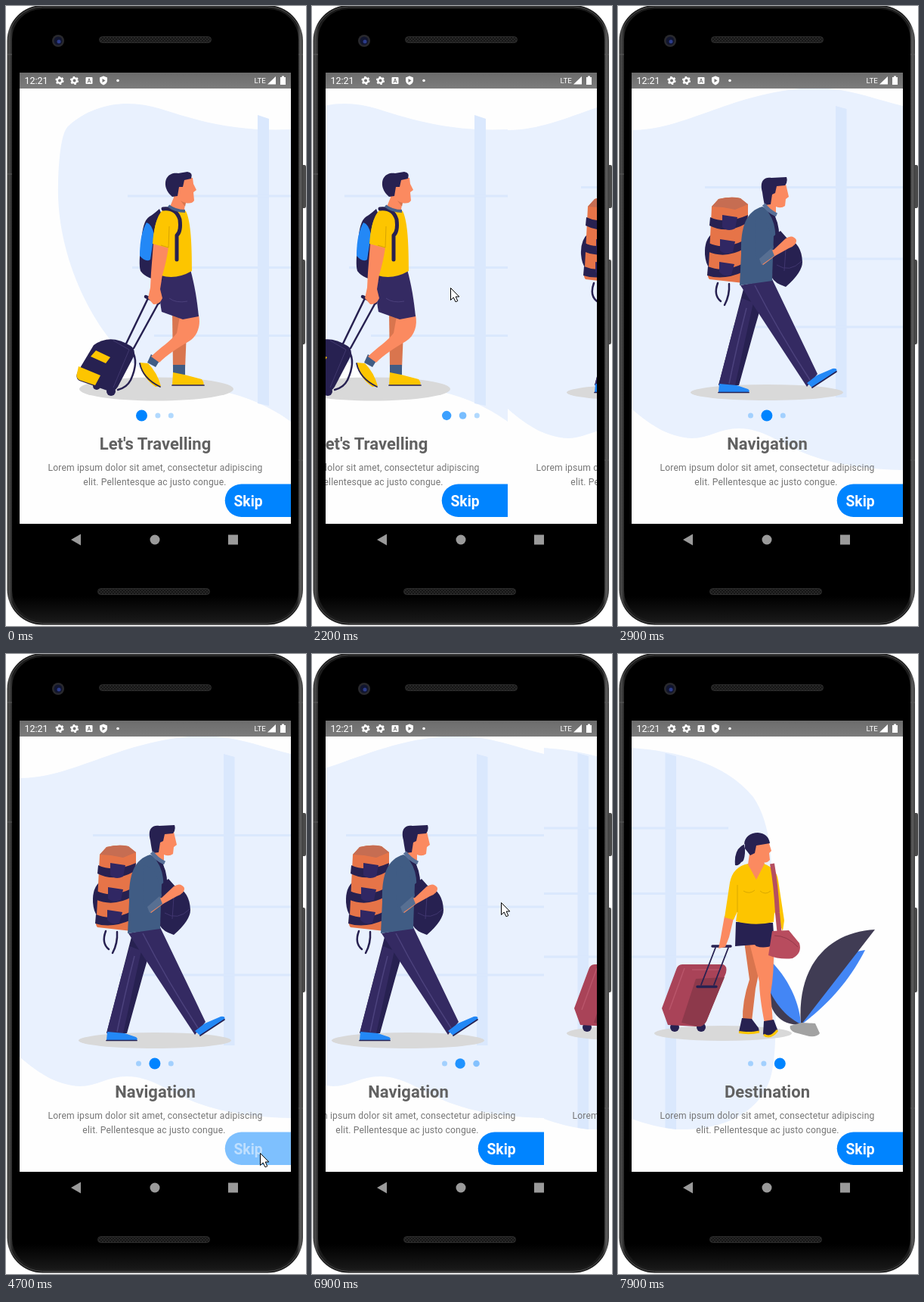
These frames come from a looping animation (397 by 819 pixels, 8000 ms). An HTML page:

```html
<!DOCTYPE html>
<html lang="en">
<head>
<meta charset="utf-8">
<title>Travel onboarding</title>
<style>
  html, body { margin: 0; width: 100%; height: 100%; overflow: hidden; background: #fff; }
  svg { display: block; width: 397px; height: 819px; font-family: Roboto, sans-serif; }
  .title { font-weight: 700; font-size: 22px; fill: #616161; text-anchor: middle; }
  .copy { font-size: 12.1px; letter-spacing: .17px; fill: #757575; text-anchor: middle; }
  .press { opacity: var(--press, 1); }
  .blob { fill: #e9f1fe; }
  .bars { fill: none; stroke: #dae8fd; stroke-width: 3; }
  .pane { fill: #dae8fd; }
  .shadow { fill: #d9d9d9; }
  .navy { fill: #272151; }
  .indigo { fill: #342a62; }
  .skin { fill: #fb8a60; }
  .tan { fill: #d9754e; }
  .yellow { fill: #fdc500; }
  .slate { fill: #405c84; }
  .blue { fill: #2388f6; }
  .line { fill: none; stroke: #272151; stroke-linecap: round; stroke-linejoin: round; }
</style>
</head>
<body>
<svg viewBox="0 0 397 819">
  <defs>
    <clipPath id="screen"><path d="M18 109H377V684H18Z"/></clipPath>
    <linearGradient id="rim" x2="1">
      <stop offset="0" stop-color="#222"/><stop offset=".008" stop-color="#484848"/>
      <stop offset=".02" stop-color="#1b1b1b"/><stop offset=".98" stop-color="#1b1b1b"/>
      <stop offset=".992" stop-color="#606060"/><stop offset="1" stop-color="#3a3a3a"/>
    </linearGradient>
    <linearGradient id="chin" x2="0" y2="1">
      <stop offset=".96" stop-color="#000"/><stop offset="1" stop-color="#181818"/>
    </linearGradient>
    <linearGradient id="bar" x2="0" y2="1">
      <stop offset="0" stop-color="#6c6c6c"/><stop offset="1" stop-color="#7c7c7c"/>
    </linearGradient>
    <pattern id="mesh" width="4" height="4" patternUnits="userSpaceOnUse">
      <path d="M0 0H4V4H0Z" fill="#161616"/><path d="M0 0L4 4M4 0L0 4" stroke="#2c2c2c" stroke-width=".8"/>
    </pattern>
    <g id="gear" fill="none" stroke="#fff">
      <circle r="3.2" stroke-width="2.4"/>
      <circle r="4.7" stroke-width="1.8" stroke-dasharray="2.46"/>
    </g>
    <g id="footer">
      <text class="copy" x="197.5" y="614">Lorem ipsum dolor sit amet, consectetur adipiscing</text>
      <path class="press" d="M377 631.500H311.500A21.750 21.750 0 0 0 311.500 675H377Z" fill="#0084ff"/>
      <text class="press" x="301.500" y="661" font-size="19.300" font-weight="700" fill="#fff">Skip</text>
    </g>
  </defs>

  <!-- phone body -->
  <g>
    <path d="M390 210H395Q397 210 397 213V264Q397 267 395 267H390ZM390 335H394Q396 335 396 338V444Q396 447 394 447H390Z" fill="#4a4a4a"/>
    <rect x="1.500" y="-1" width="391.500" height="818.500" rx="47" fill="url(#rim)"/>
    <rect x="3" y="1" width="388.500" height="814.500" rx="45.500" fill="none" stroke="#4c4c4c"/>
    <rect x="8" y="4" width="379" height="808" rx="40" fill="url(#chin)"/>
    <path d="M2 64H8M2 222H8M387 64H393M387 600H393" stroke="#5a5a5a"/>
    <rect x="123.500" y="40.500" width="148" height="8" rx="4" fill="url(#mesh)" stroke="#2c2c2c"/>
    <rect x="121.500" y="769.500" width="148" height="8" rx="4" fill="url(#mesh)" stroke="#2c2c2c"/>
    <circle cx="69" cy="46" r="8" fill="#29292d"/>
    <circle cx="69" cy="46" r="5.500" fill="#11152f"/>
    <circle cx="70" cy="47" r="2.500" fill="#2c3c8a"/>
    <g fill="#9a9a9a">
      <path d="M86 705L99 697.500V712.500Z"/><circle cx="197" cy="705" r="6.500"/><path d="M294 698.500H307V711.500H294Z"/>
    </g>
  </g>

  <!-- status bar -->
  <path d="M18 88H377V109H18Z" fill="url(#bar)"/>
  <g fill="#fff">
    <text x="24.500" y="103" font-size="12.500">12:21</text>
    <use href="#gear" x="71" y="98.500"/><use href="#gear" x="90.500" y="98.500"/>
    <rect x="105.500" y="94" width="9" height="9" rx="1"/>
    <path d="M108 101.500L110 95.800L112 101.500M108.800 99.800H111.200" fill="none" stroke="#757575"/>
    <path d="M129 92.500L134 94.500V98Q134 102.500 129 104.500Q124 102.500 124 98V94.500Z"/>
    <path d="M127.500 96L131.500 98.500L127.500 101Z" fill="#757575"/>
    <circle cx="148" cy="98.500" r="1.800"/>
    <text x="328.500" y="102" font-size="9.800">LTE</text>
    <path d="M346 103.500H357V93Z"/>
    <path d="M363 94H365V92.500H368V94H370V104H363Z"/>
  </g>

  <path d="M18 109H377V684H18Z" fill="#fefefe"/>
  <g clip-path="url(#screen)">
    <g class="page">
      <path class="blob" d="M69 235C70 195 74 167 82 159C115 129 160 122 205 136C260 154 310 166 377 163V549C350 530 318 514 275 507C235 500 198 496 168 472C115 428 66 330 69 235Z"/>
      <path class="pane" d="M333 144L348 149V528L333 525Z"/>
      <path class="bars" d="M161 251H377M167 345.500H377M196 435.500H377"/>
      <ellipse class="shadow" cx="199" cy="506" rx="102" ry="15.500"/>
      <!-- suitcase -->
      <path class="line" stroke-width="2.500" d="M159 446L188 386M169 452L202 392M167 456Q176 470 165 494Q160 504 148 507"/>
      <path class="line" stroke-width="4.500" d="M185 384L202 392"/>
      <circle class="navy" cx="120" cy="502" r="5"/><circle class="navy" cx="139" cy="509" r="6"/>
      <path class="navy" d="M116 448Q138 432 165 449Q172 454 169 463L148 503Q143 511 134 508L97 495Q91 491 95 483Z"/>
      <path d="M142 442L163 454L142 504" fill="none" stroke="#40376d"/>
      <path class="yellow" d="M119 455L138 464L132 472L112 463ZM96 476L125 488L118 501L97 494Q92 491 94 485Z"/>
      <!-- legs -->
      <path class="tan" d="M220 405H240L237 479H221Z"/>
      <path class="slate" d="M221 474H237V487H221ZM192 460L203 469L198 477L187 471Z"/>
      <path class="skin" d="M230 410L255 408C258 421 254 436 242 443C226 452 212 462 203 471L192 463C204 451 218 443 226 432Z"/>
      <path class="yellow" d="M221 484L236 487L259 493Q263 498 261 501H220ZM177 471L188 472Q200 484 205 502L198 503Q180 491 177 471Z"/>
      <path class="line" stroke-width="1.700" d="M220 501H262M177 472Q181 492 204 503"/>
      <path class="indigo" d="M205 356L244 348C250 370 253 390 255 410L234 414L206 404C203 390 203 372 205 356Z"/>
      <path d="M216 386Q225 393 240 390" fill="none" stroke="#4b407b"/>
      <!-- backpack and torso -->
      <path class="navy" d="M203 268Q194 276 190 278Q180 284 179 315Q175 340 178 350Q186 361 207 363L216 300Z"/>
      <path class="blue" d="M186 286Q177 301 177 330Q185 339 191 335L196 302Q193 288 186 286Z"/>
      <path class="yellow" d="M208 269Q222 263 238 271C245 285 246 318 246 350Q225 362 205 356C208 338 203 327 195 316C195 293 200 276 208 269Z"/>
      <path class="skin" d="M195 314L215 319Q212 339 207 355L204 374L207 386Q203 395 195 394L188 386L191 372L192 352Z"/>
      <path class="yellow" d="M203 277Q216 280 217 300L216 320L194 314Q196 287 203 277Z"/>
      <path d="M216 291L215 319L205 316" fill="none" stroke="#d9a400"/>
      <path class="line" stroke-width="5" d="M208 268Q225 266 230 282Q232 298 226 303V335"/>
      <!-- head -->
      <path class="skin" d="M220 242L236 226L247 227L248 235L252 243L248 246L249 257Q246 262 237 260L236 270Q225 272 217 265L222 253Z"/>
      <path class="navy" d="M212 241C208 227 217 219 228 221L240 219Q248 220 245 228L236 230L234 239L229 239L227 251L220 252Q214 247 212 241Z"/>
      <path class="tan" d="M231 257Q235 260 238 260L237 265Z"/>
      <path d="M215 264Q224 271 237 271" fill="none" stroke="#46608a" stroke-width="4"/>
      <text class="title" x="197.500" y="586">Let's Travelling</text>
      <text class="copy" x="197" y="633">elit. Pellentesque ac justo congue.</text>
      <use href="#footer"/>
    </g>

    <g class="page">
      <path class="blob" d="M18 164C90 164 150 114 255 108C305 108 335 122 377 132V613C330 612 290 607 250 592C215 577 190 558 160 558C135 558 120 571 98 571C70 570 45 556 18 532Z"/>
      <path class="pane" d="M288 132L302.500 136V517L288 517Z"/>
      <path class="bars" d="M115 239.500H377M121 334H377M150 424H377"/>
      <ellipse class="shadow" cx="197" cy="510.500" rx="101" ry="10.500"/>
      <!-- backpack -->
      <path class="navy" d="M125 300Q114 309 115 328Q116 341 121 346L165 340V290Z"/>
      <path d="M124 265L133 255Q150 251 162 254L172 262V285L166 330V366L121 361Q117 357 120 345Z" fill="#e67448"/>
      <path d="M124 265L133 255Q150 251 162 254L172 262L155 269L139 266Z" fill="#c66d52"/>
      <path class="navy" d="M122 279Q143 289 172 276L170 287Q144 302 121 290ZM120 313Q140 323 168 309V320Q142 335 118 324ZM119 344Q140 353 166 340V351Q140 363 118 356Z"/>
      <path d="M138 276L158 279L155 294Q145 299 138 292ZM135 308L155 311L152 325Q142 330 135 323ZM134 338L154 341L150 355Q140 359 134 351Z" fill="#302763"/>
      <path class="line" stroke-width="2.500" d="M132 366Q126 382 136 390M147 367Q148 382 141 395"/>
      <!-- legs -->
      <path class="navy" d="M167 370L188 401L181 425L160 501H133L152 428Z"/>
      <path class="indigo" d="M164 386L179 392L155 501H133L152 428ZM162 369L204 361L264 486L250 503L196 421Z"/>
      <path d="M181 369Q213 431 254 494M170 399Q157 450 147 499" fill="none" stroke="#4c427d" stroke-width="1.500"/>
      <path class="blue" d="M134 499L157 501L172 506Q175 508 173 510H133ZM250 498L263 488L284 479Q291 478 289 483L257 504Z"/>
      <path class="line" stroke-width="1.700" d="M133 510.500H173M257 504L289 483"/>
      <!-- torso, bag and arm -->
      <path class="slate" d="M191 265C170 271 162 291 163 327L161 369L204 363Q205 346 209 333Q213 295 207 274Z"/>
      <path class="navy" d="M206 304L215 297L223 306Q243 313 244 338Q244 352 222 371Q207 366 204 359Z"/>
      <path d="M210 342Q227 353 243 337M223 307L220 350" fill="none" stroke="#40366f"/>
      <path class="line" stroke-width="5" d="M201 271Q211 285 211 306"/>
      <path class="skin" d="M188 326L206 322L222 307Q231 301 236 309Q237 316 226 320L208 330L192 342Q184 337 188 326Z"/>
      <path class="slate" d="M181 279Q197 280 201 299L206 319L189 341Q179 333 183 309Z"/>
      <path d="M203 320L207 330L190 342L187 334Z" fill="#576f92"/>
      <!-- head -->
      <path class="skin" d="M200 250L209 237L222 235L226 252L222 255L221 264Q216 268 209 265V274L194 266Z"/>
      <path class="navy" d="M191 246C187 232 193 225 203 227L223 226Q225 232 221 237L210 238L208 247L204 249L202 262L194 263Q192 254 191 246Z"/>
      <path d="M193 262Q199 271 210 276" fill="none" stroke="#587098" stroke-width="5"/>
      <text class="title" x="197.500" y="586">Navigation</text>
      <text class="copy" x="196" y="633">elit. Pellentesque ac justo congue.</text>
      <use href="#footer"/>
    </g>

    <g class="page">
      <path class="blob" d="M18 124C75 128 142 143 179 189C210 235 202 300 207 390C209 445 211 525 203 555C190 608 135 630 78 628C55 626 35 620 18 614Z"/>
      <path class="pane" d="M62.500 131L77 135V628L62.500 626Z"/>
      <path class="bars" d="M18 230H146M18 316.500H150M18 400H145"/>
      <ellipse class="shadow" cx="139" cy="501" rx="91" ry="10"/>
      <!-- plant -->
      <path d="M327 391L316 393L242 482V490C282 460 308 428 327 391Z" fill="#4386f5"/>
      <path d="M340 364C280 367 236 410 242 490L312 400ZM197 436C199 474 214 490 242 490Z" fill="#403c54"/>
      <path d="M195 399C220 420 240 455 242 489C221 479 206 459 197 437Z" fill="#4386f5"/>
      <path d="M228 491L243 487L261 488L267 501Q264 506 253 505L234 500Q226 496 228 491Z" fill="#a2a2a2"/>
      <!-- suitcase -->
      <circle class="navy" cx="75" cy="493" r="6"/><circle class="navy" cx="110" cy="493" r="6"/>
      <path d="M85 410H139Q145 412 143 421L117 485Q113 493 104 492L66 490L58 468L77 417Q79 410 85 410Z" fill="#a94358"/>
      <path d="M103 429L141 427L117 485Q113 493 104 492L84 487Z" fill="#8d394b"/>
      <path d="M88 415L68 470M98 417H134" stroke="#b9556a" stroke-width="1.500"/>
      <path class="line" stroke-width="1.800" d="M129 388L110 437M146 388L127 437"/>
      <path class="line" stroke-width="3.500" d="M125 386H149M105 439.500H130"/>
      <!-- legs -->
      <path class="tan" d="M167 380L189 384Q188 418 182 442L177 485H165Q164 459 174 430Z"/>
      <path class="skin" d="M174 382H206Q207 420 202 448L205 488H194Q187 452 187 433Z"/>
      <path class="navy" d="M164 481L177 482L186 494L187 499H160ZM193 485L206 483L211 496Q208 505 196 506L192 502Z"/>
      <path d="M160 499.500Q174 502 187 499M193 503Q202 509 211 497" fill="none" stroke="#fdc500" stroke-width="3"/>
      <path class="navy" d="M156 354L205 355L207 384Q194 390 183 386L181 384L155 386Z"/>
      <!-- torso and bag -->
      <path class="skin" d="M141 346L153 349L147 374L142 387L133 389L136 374Z"/>
      <path class="yellow" d="M172 277Q152 281 148 302L141 348L153 351L158 340L156 353Q181 360 206 354L207 341L218 366L220 352L212 299Q210 283 193 277Z"/>
      <path class="skin" d="M174 264H189L194 277L183 298L172 278Z"/>
      <path d="M166 313Q174 318 181 312M188 313Q195 319 202 313M158 305V341" fill="none" stroke="#d9a900"/>
      <path d="M204 277Q209 305 211 342L214 372" fill="none" stroke="#b54f60" stroke-width="6"/>
      <path d="M204 366L226 365L240 382Q244 395 231 402Q214 404 199 398Z" fill="#b84c5e"/>
      <path d="M207 372Q224 372 238 387" fill="none" stroke="#94394b"/>
      <!-- head -->
      <path class="skin" d="M178 253L199 247L203 260L200 263L201 272Q195 279 185 272L176 270Z"/>
      <path class="navy" d="M168 257C164 244 174 236 185 236Q199 237 201 250L183 253L181 263L175 266ZM168 251Q153 257 155 279Q160 280 163 275Q167 275 168 263Z"/>
      <text class="title" x="197.500" y="586">Destination</text>
      <text class="copy" x="198" y="633">elit. Pellentesque ac justo congue.</text>
      <use href="#footer"/>
    </g>
  </g>

  <g fill="#0084ff"><circle class="dot" cy="541"/><circle class="dot" cy="541"/><circle class="dot" cy="541"/></g>
  <path id="cursor" d="M.5 .5V16.500L4.200 13L7 18.800L9.800 17.600L7.200 12H11.800Z" fill="#fff" stroke="#000" stroke-linejoin="round"/>
</svg>
<script>
  const LOOP = 8000, STEP = 100, PAGE = 359;

  // rows: time, then values
  const scroll = [[1800, 0], [1900, 10], [2200, 118], [2700, 299], [2800, 341], [2900, PAGE],
    [6500, PAGE], [6600, 365], [6900, 429], [7000, 429], [7600, 573], [7700, 638], [7800, 698], [7900, 718]];
  const press = [[4400, 1], [4600, .5], [4800, .5], [5000, 1]];
  const pointer = [[800, 0, 48], [1100, 140, 759], [1600, 323, 363], [1800, 323, 363],
    [2200, 183, 372], [2700, 2, 400], [3000, 132, 423], [3100, 132, 423], [3300, 212, 432],
    [3400, 212, 432], [4200, 336, 659], [4800, 336, 659], [5300, 327, 377], [5400, 330, 363],
    [5500, 330, 363], [5800, 330, 319], [6000, 331, 319], [6300, 336, 329], [6500, 336, 329],
    [6900, 250, 328], [7000, 250, 328], [7600, 82, 353], [7700, 56, 240], [7800, 45, 46]];

  const pages = document.querySelectorAll('.page');
  const dots = document.querySelectorAll('.dot');
  const cursor = document.getElementById('cursor');

  function sample(rows, t) {
    const next = rows.findIndex(row => row[0] > t);
    if (next === 0) return rows[0].slice(1);
    if (next < 0) return rows[rows.length - 1].slice(1);
    const a = rows[next - 1], b = rows[next];
    const k = (t - a[0]) / (b[0] - a[0]);
    return a.slice(1).map((v, i) => v + (b[i + 1] - v) * k);
  }

  function draw(t) {
    const offset = Math.round(sample(scroll, t)[0]);
    pages.forEach((page, i) => page.setAttribute('transform', `translate(${i * PAGE - offset})`));

    let left = 172;
    dots.forEach((dot, i) => {
      const active = Math.max(0, 1 - Math.abs(offset / PAGE - i));
      const size = 7 + 8 * active;
      dot.setAttribute('cx', left + size / 2);
      dot.setAttribute('r', size / 2);
      dot.setAttribute('opacity', .3 + .7 * active);
      left += size + 10.4;
    });

    document.documentElement.style.setProperty('--press', sample(press, t)[0]);
    const [x, y] = sample(pointer, t).map(Math.round);
    cursor.setAttribute('transform', `translate(${x} ${y})`);
    const shown = (t >= 800 && t < 2800) || (t >= 3100 && t < 7900);
    cursor.setAttribute('visibility', shown ? 'visible' : 'hidden');
  }

  const start = performance.now();
  function tick() {
    const t = (performance.now() - start) % LOOP;
    draw(Math.floor(t / STEP) * STEP);
    requestAnimationFrame(tick);
  }
  tick();
</script>
</body>
</html>
```
